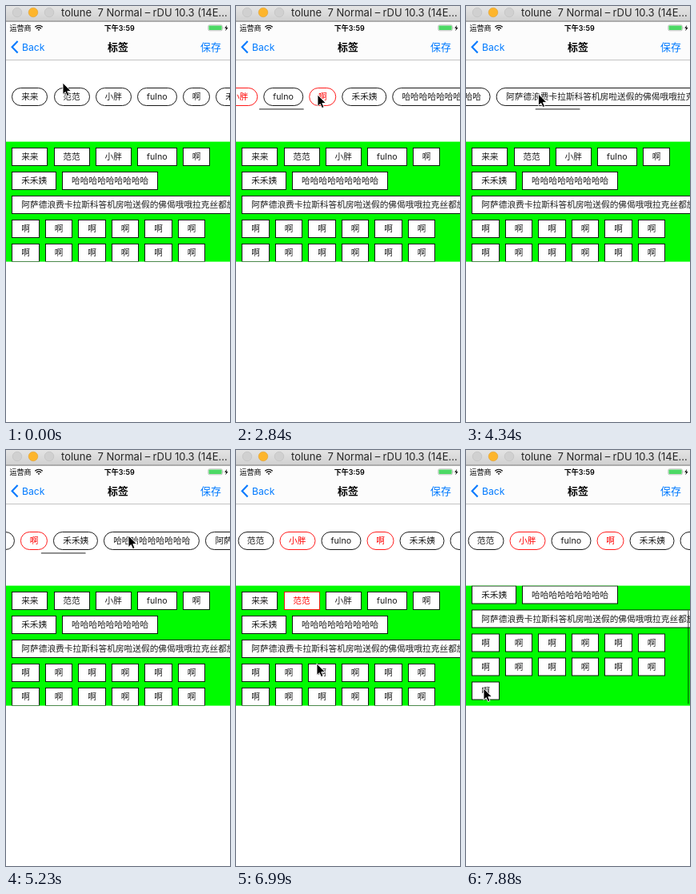
Recreate the animation shown at these times as an HTML page. Size 280 by 520 pixels, loop 8000 ms.

```html
<!DOCTYPE html>
<html lang="zh-CN">
<head>
<meta charset="utf-8">
<title>标签</title>
<style>
html, body { margin: 0; width: 100%; height: 100%; overflow: hidden; background: #fff; }
svg { display: block; width: 280px; height: 520px; font-family: Inter, "Noto Sans CJK SC", "Noto Sans CJK", sans-serif; }
.chip rect { fill: #fff; stroke: #000; stroke-width: .9; }
.chip text { font-size: 10.7px; text-anchor: middle; fill: #1c1c1c; }
.chip.on rect { stroke: #f00; }
.chip.on text { fill: #f00; }
.bar { font-size: 13px; fill: #262626; }
.blue { fill: #007aff; }
</style>
</head>
<body>
<svg viewBox="0 0 280 520">
  <defs>
    <linearGradient id="chrome" x2="0" y2="1">
      <stop stop-color="#e4e4e4"/><stop offset="1" stop-color="#d0d0d0"/>
    </linearGradient>
    <clipPath id="box"><rect y="169.6" width="280" height="150"/></clipPath>
  </defs>
  <rect width="280" height="520" fill="#fff"/>

  <rect y="19" width="280" height="48.5" fill="#fcfcfc"/>
  <rect y="67" width="280" height="1" fill="#c4c4c4"/>
  <rect width="280" height="19" fill="url(#chrome)"/>
  <rect y="18.6" width="280" height="1" fill="#777"/>
  <g stroke-width=".6">
    <circle cx="14" cy="8" r="5.8" fill="#d0d0d0" stroke="#bcbcbc"/>
    <circle cx="34" cy="8" r="5.8" fill="#fdb52c" stroke="#e0a030"/>
    <circle cx="54" cy="8" r="5.8" fill="#d0d0d0" stroke="#bcbcbc"/>
  </g>
  <g class="bar">
    <text x="69" y="12.7">tolune</text>
    <text x="114.5" y="12.7">7 Normal –</text>
    <text x="183.5" y="12.7">rDU</text>
    <text x="211" y="12.7">10.3 (14E...</text>
  </g>

  <text x="4.5" y="31" font-size="9">运营商</text>
  <g fill="none" stroke="#000" stroke-width="1.2">
    <path d="M36.3 26.3Q41 22.2 45.7 26.3M38 28.2Q41 25.6 44 28.2"/>
    <path d="M39.6 29.4Q41 28.4 42.4 29.4L41 31Z" fill="#000" stroke="none"/>
  </g>
  <text x="141.8" y="31" font-size="9" font-weight="600" text-anchor="middle">下午3:59</text>
  <rect x="252.8" y="23.8" width="17.6" height="7" rx="1.6" fill="none" stroke="#aaa" stroke-width=".7"/>
  <rect x="253.5" y="24.5" width="16.2" height="5.6" rx=".8" fill="#4cd964"/>
  <path d="M271.2 26v2.6q1.2-1.3 0-2.6" fill="#aaa"/>
  <path d="M276.2 23.8l-3 4h2l-1 3.4 3.4-4.3h-2.2z"/>

  <path d="M14.6 44L7.6 51.3l7 7.3" fill="none" stroke="#007aff" stroke-width="2.1"/>
  <text class="blue" x="20" y="56" font-size="12.2">Back</text>
  <text x="140" y="56" font-size="12.9" font-weight="700" text-anchor="middle">标签</text>
  <text class="blue" x="256" y="56" font-size="12.9" text-anchor="middle">保存</text>

  <g id="strip"></g>
  <rect id="hbar" y="128" width="56" height="1.8" rx=".9" fill="#000" fill-opacity=".5"/>

  <rect y="169.6" width="280" height="150" fill="#00fb00"/>
  <g clip-path="url(#box)">
    <g id="grid"></g>
    <rect id="vbar" x="276.9" width="1.9" rx=".9" fill="#000" fill-opacity=".42"/>
  </g>

  <path id="cursor" d="M0 0V14.5L3.3 11.5 5.5 16.6 8 15.5 5.8 10.5H10.4Z" stroke="#fff" stroke-width=".9"/>
</svg>
<script>
const $ = id => document.getElementById(id);
const GAP = 7.5, H = 22, LOOP = 8000, TICK = 148.8, MAX = 37.5;
const rows = [
  ['来来', '范范', '小胖', 'fulno', '啊'],
  ['禾禾姨', '哈'.repeat(9)],
  ['阿萨德浪费卡拉斯科答机房啦送假的佛偈哦哦拉克丝都放假的佛偈阿萨德浪费'],
  ...[6, 6, 1].map(n => Array(n).fill('啊'))
];

function add(parent, tag, attrs) {
  const el = document.createElementNS('http://www.w3.org/2000/svg', tag);
  for (const a in attrs) el.setAttribute(a, attrs[a]);
  return parent.appendChild(el);
}

const widthOf = s => s === 'fulno' ? 49.5 : 23.3 + 10.7 * s.length;
const snap = x => Math.floor(x) + .5;

function addRow(parent, labels, y, rx) {
  let x = GAP;
  return labels.map(label => {
    const w = widthOf(label), left = snap(x + .37), right = snap(x + w - .37);
    const g = add(parent, 'g', { class: 'chip' });
    add(g, 'rect', { x: left, y, width: right - left, height: H, rx });
    add(g, 'text', { x: x + w / 2, y: y + 14.9 }).textContent = label;
    x += w + GAP;
    return g;
  });
}

const strip = addRow($('strip'), rows.flat(), 102.5, H / 2);
const grid = rows.map((r, i) => addRow($('grid'), r, 177.5 + 30 * i, 0));

// Stops are [tick, ...values]; the motion eases in and out between them.
const pointer = [
  [1, 71, 96], [5, 117, 110], [7, 117, 110], [11, 236.5, 108], [15, 236.5, 108],
  [19, 102, 111], [22, 220, 111], [25, 78, 115], [28, 62, 112], [31, 172, 104],
  [33, 68, 92], [37, 238, 122], [40, 82, 187], [47, 101, 267], [49, 108.5, 155],
  [53, 22, 298]
];
const slide = [[15, 0], [22, 214], [27, 433], [28, 433], [33, 254], [39, 57.5]];
const lift = [[47, 0], [49, 66.7], [52, MAX]];

function glide(stops, k) {
  const i = stops.findIndex(s => s[0] > k);
  const b = stops.at(i), a = i > 0 ? stops[i - 1] : b;
  const u = a === b ? 0 : (k - a[0]) / (b[0] - a[0]);
  const f = i < 0 ? 0 : u * u * (3 - 2 * u);
  return a.slice(1).map((v, n) => v + (b[n + 1] - v) * f);
}

const move = (id, x, y) => $(id).setAttribute('transform', `translate(${x} ${y})`);
const set = (id, attrs) => Object.entries(attrs).forEach(([a, v]) => $(id).setAttribute(a, v));

function draw(t) {
  const k = Math.floor((t + 20) / TICK);
  const [x, y] = glide(pointer, k), [s] = glide(slide, k), [v] = glide(lift, k);
  move('cursor', x, y);
  move('strip', -s, 0);
  move('grid', 0, -v);
  strip[2].classList.toggle('on', k >= 6);
  strip[4].classList.toggle('on', k >= 13);
  grid[0][1].classList.toggle('on', k >= 41);

  set('hbar', { x: 2.5 + .203 * s, opacity: k > 15 && k < 42 ? 1 : 0 });
  const height = 117 - Math.max(0, v - MAX) * 1.05;
  const top = v > MAX ? 317.5 - height : 172 + v / MAX * 28.5;
  set('vbar', { y: top, height, opacity: k > 47 ? 1 : 0 });
}

const begin = performance.now();
function loop() {
  draw((performance.now() - begin) % LOOP);
  requestAnimationFrame(loop);
}
loop();
</script>
</body>
</html>
```
